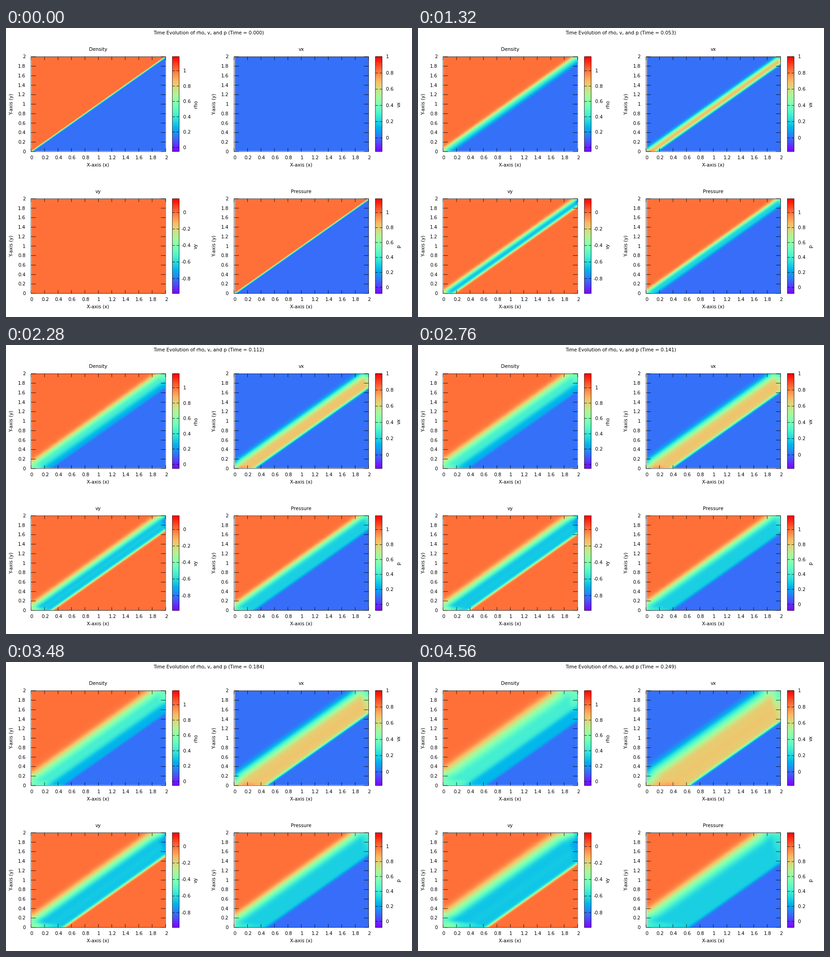
A matplotlib script that plays this animation: 885x632 px, repeating every 4.68 s.

```python
import numpy as np
import matplotlib.pyplot as plt
from matplotlib.animation import FuncAnimation

W, H, DPI = 885, 632, 100
FRAMES, INTERVAL = 39, 120
N, SIZE, GAMMA = 100, 2.0, 1.4
DX = SIZE / N
SWAP = [0, 2, 1, 3]

plt.rcParams.update({"font.family": "DejaVu Sans", "font.size": 10.4 * 72 / DPI,
                     "path.snap": False})
LW = 0.8 * 72 / DPI


# ---- Euler equations: MUSCL reconstruction, HLL fluxes, x sweep then y sweep

def to_cons(w):
    r, u, v, p = w
    return np.stack([r, r * u, r * v, p / (GAMMA - 1) + r * (u * u + v * v) / 2])


def to_prim(q):
    r, u, v = q[0], q[1] / q[0], q[2] / q[0]
    return np.stack([r, u, v, (GAMMA - 1) * (q[3] - r * (u * u + v * v) / 2)])


def flux(w, q):
    r, u, v, p = w
    return np.stack([r * u, r * u * u + p, r * u * v, u * (q[3] + p)])


def hll(a, b):
    ca, cb = (np.sqrt(GAMMA * s[3] / s[0]) for s in (a, b))
    lo = np.minimum(np.minimum(a[1] - ca, b[1] - cb), 0)
    hi = np.maximum(np.maximum(a[1] + ca, b[1] + cb), 0)
    qa, qb = to_cons(a), to_cons(b)
    return (hi * flux(a, qa) - lo * flux(b, qb) + lo * hi * (qb - qa)) / (hi - lo)


def rate(q):
    """Rate of change caused by fluxes along the last axis."""
    pad = np.pad(to_prim(q), ((0, 0), (0, 0), (2, 2)), mode="edge")
    d = np.diff(pad, axis=2)
    a, b = d[..., :-1], d[..., 1:]
    slope = np.where(a * b > 0, np.where(abs(a) < abs(b), a, b), 0) / 2
    mid = pad[..., 1:-1]
    f = hll((mid + slope)[..., :-1], (mid - slope)[..., 1:])
    return (f[..., :-1] - f[..., 1:]) / DX


def sweep(q, dt):
    q1 = q + dt * rate(q)
    return (q + q1 + dt * rate(q1)) / 2


def flip(q):
    """Exchange the roles of x and y."""
    return q[SWAP].transpose(0, 2, 1)


def step(q, dt):
    return flip(sweep(flip(sweep(q, dt)), dt))


def corner_mean(w):
    return (w[:, 1:, 1:] + w[:, :-1, 1:] + w[:, 1:, :-1] + w[:, :-1, :-1]) / 4


def simulate(times):
    j, i = np.indices((N, N))
    upper = j >= i
    zero = np.zeros((N, N))
    q = to_cons(np.stack([np.where(upper, 1, 0.125), zero, zero,
                          np.where(upper, 1, 0.1)]))
    out = [corner_mean(to_prim(q))]
    for gap in np.diff(times):
        n = max(1, round(gap / 0.0024))
        for _ in range(n):
            q = step(q, gap / n)
        out.append(corner_mean(to_prim(q)))
    return out


# output is written every two steps at first, then every three
TIMES = np.interp(np.arange(FRAMES), [0, 5, 11, 15, 38],
                  [0, 0.0248, 0.0534, 0.0827, 0.249])
FIELDS = simulate(TIMES)


# ---- Drawing, in pixel coordinates with y pointing down

fig = plt.figure(figsize=(W / DPI, H / DPI), dpi=DPI, facecolor="white")
ax = fig.add_axes([0, 0, 1, 1])
ax.axis("off")

PW, PH = 293.3, 207.3
FINE = 4


def text(x, y, s, ha="center", rot=0):
    return ax.text(x, y, s, ha=ha, va="baseline", rotation=rot,
                   rotation_mode="anchor", zorder=4)


def line(xs, ys):
    ax.plot(xs, ys, color="black", lw=LW, solid_capstyle="butt",
            solid_joinstyle="miter", snap=False, zorder=3)


def hline(y, x0, x1):
    line([x0, x1], [y, y])


def vline(x, y0, y1):
    line([x, x], [y0, y1])


def box(x0, x1, y0, y1):
    line([x0, x1, x1, x0, x0], [y0, y0, y1, y1, y0])


def refine(data):
    """Split cells so that their edges come out smooth at any pixel offset."""
    return data.repeat(FINE, axis=0).repeat(FINE, axis=1)


def heat(data, x0, x1, y0, y1, lo, hi, smooth):
    return ax.imshow(data, cmap="rainbow", vmin=lo, vmax=hi, origin="lower",
                     extent=(x0, x1, y1, y0), aspect="auto",
                     interpolation=smooth, zorder=1)


def panel(x0, y0, title, unit, lo, hi, ticks):
    x1, y1 = x0 + PW, y0 + PH
    mx, my = PW / SIZE * DX / 2, PH / SIZE * DX / 2
    img = heat(refine(np.zeros((N - 1, N - 1))), x0 + mx, x1 - mx,
               y0 + my, y1 - my, lo, hi, "hanning")
    box(x0, x1, y0, y1)
    for k in range(11):
        label = f"{k / 5:g}"
        x, y = x0 + PW * k / 10, y1 - PH * k / 10
        text(x + 1.2, y1 + 16.8, label)
        text(x0 - 12, y + 3.6, label, "right")
        hline(y, x0, x0 + 10.3)
        hline(y, x1 - 10.3, x1)
        vline(x, y0, y0 + 7.3)
        vline(x, y1 - 7.3, y1)
    text(x0 + PW / 2 - 0.5, y0 - 12.6, title)
    text(x0 + PW / 2 - 0.5, y1 + 32.3, "X-axis (x)")
    text(x0 - 40, y0 + PH / 2, "Y-axis (y)", rot=90)

    b0, b1 = x1 + 0.05 * PW, x1 + 0.1 * PW
    heat(np.linspace(lo, hi, 256)[:, None], b0, b1, y0, y1, lo, hi, "nearest")
    box(b0, b1, y0, y1)
    for v in ticks:
        y = y1 - (v - lo) / (hi - lo) * PH
        hline(y, b0, b0 + 5.5)
        hline(y, b1 - 5.5, b1)
        text(b1 + 5.5, y + 3.6, f"{v: g}", "left")
    text(x1 + 69, y0 + PH / 2, unit, rot=90)
    return img


XL, XR, YT, YB = 54.68, 497.18, 62.88, 373.28
POS = [0, 0.2, 0.4, 0.6, 0.8, 1]
images = [
    panel(XL, YT, "Density", "rho", -0.054, 1.183, POS),
    panel(XR, YT, "vx", "vx", -0.169, 1.0, POS),
    panel(XL, YB, "vy", "vy", -0.98, 0.166, [-0.8, -0.6, -0.4, -0.2, 0]),
    panel(XR, YB, "Pressure", "p", -0.082, 1.186, POS),
]
heading = text(442, 13.8, "")
ax.set_xlim(0, W)
ax.set_ylim(H, 0)


def update(k):
    for img, field in zip(images, FIELDS[k]):
        img.set_data(refine(field))
    heading.set_text(f"Time Evolution of rho, v, and p (Time = {TIMES[k]:.3f})")
    return [*images, heading]


anim = FuncAnimation(fig, update, frames=FRAMES, interval=INTERVAL,
                     repeat=True, repeat_delay=0, blit=False)
plt.show()
```
